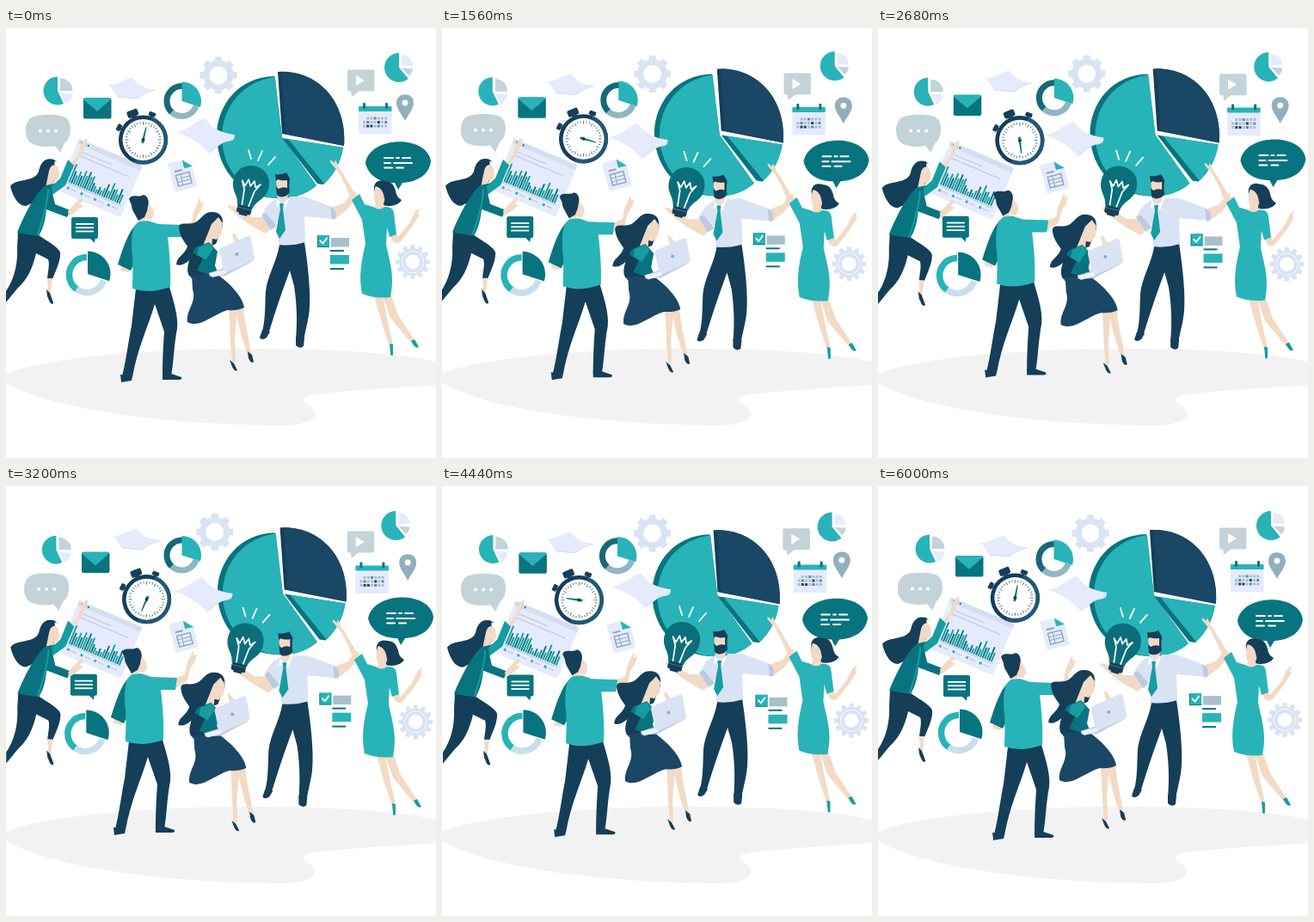
An HTML page with a canvas that plays this animation: 500 px wide and 500 px high, repeating every 6040 ms.

```html
<!DOCTYPE html>
<html lang="en">
<head>
<meta charset="utf-8">
<title>Team at work</title>
<style>
html, body { margin: 0; width: 100%; height: 100%; overflow: hidden; background: #fff; }
canvas { display: block; width: 500px; height: 500px; }
</style>
</head>
<body>
<canvas id="stage" width="500" height="500"></canvas>
<script>
const canvas = document.getElementById('stage');
const ratio = window.devicePixelRatio || 1;
canvas.width = canvas.height = 500 * ratio;
const c = canvas.getContext('2d');
const LOOP = 6040, TAU = Math.PI * 2;
const NAVY = '#1a4765', INK = '#153e59', TEAL = '#28b3b8', DEEP = '#08747f', MID = '#159da1',
  PALE = '#e5ebfc', MIST = '#c3d3d8', SKIN = '#f2dac5', SHIRT = '#d9e3f3', GEAR = '#d8e3f3', WHITE = '#fff';

// ---- drawing helpers ----
function fill(d, color) { c.fillStyle = color; c.fill(new Path2D(d)); }
function stroke(d, color, width) {
  c.strokeStyle = color; c.lineWidth = width;
  c.lineCap = c.lineJoin = 'round';
  c.stroke(new Path2D(d));
}
function rect(x, y, w, h, color, r = 0) {
  c.fillStyle = color; c.beginPath(); c.roundRect(x, y, w, h, r); c.fill();
}
function disc(x, y, r, color) {
  c.fillStyle = color; c.beginPath(); c.arc(x, y, r, 0, TAU); c.fill();
}
// angles in turns, clockwise from the top
function wedge(x, y, r, a, b, color) {
  c.fillStyle = color; c.beginPath(); c.moveTo(x, y);
  c.arc(x, y, r, (a - .25) * TAU, (b - .25) * TAU); c.closePath(); c.fill();
}
function ring(x, y, r, w, a, b, color) {
  c.strokeStyle = color; c.lineWidth = w; c.lineCap = 'butt'; c.beginPath();
  c.arc(x, y, r, (a - .25) * TAU, (b - .25) * TAU); c.stroke();
}
function turned(x, y, angle, draw) {
  c.save(); c.translate(x, y); c.rotate(angle); draw(); c.restore();
}
function gear(x, y, n, r, tooth, band) {
  turned(x, y, 0, () => {
    for (let i = 0; i < n; i++) {
      rect(-tooth / 2, -r, tooth, 7, GEAR, 1);
      c.rotate(TAU / n);
    }
    ring(0, 0, r - 4 - band / 2, band, 0, 1, GEAR);
  });
}
// drift: amplitude and time of the largest value on each axis
function part(ax, tx, ay, ty, draw) {
  const swing = (a, peak) => a * (Math.cos((now - peak) / LOOP * TAU) - Math.cos(peak / LOOP * TAU));
  c.save(); c.translate(swing(ax, tx), swing(ay, ty)); draw(); c.restore();
}
let now = 0;

// ---- scenery ----
function ground() {
  fill('M0 402C40 385 150 374 270 373C370 372 460 378 500 388V415C460 418 400 421 360 426C340 429 344 434 354 440C367 452 354 461 325 462C200 462 50 445 0 412Z', '#f2f2f3');
}
function pieBase() {
  fill('M312 56C272 57 245 88 245 126C246 168 276 198 318 198C336 198 351 192 361 183L321 127Z', DEEP);
  fill('M313 57C274 62 251 93 251 128C252 168 282 198 320 198C337 198 351 192 361 183L321 127Z', TEAL);
}
function pieSlices() {
  fill('M321 128L392 139C389 157 381 171 369 182L362 181Z', DEEP);
  fill('M328 129L392 139C389 157 381 171 370 181Z', TEAL);
  fill('M316 51C362 48 397 85 393 137L321 123Z', INK);
  fill('M320 51C364 50 396 87 393 137L325 123Z', NAVY);
}
function pieLeft() {
  wedge(60, 73, 16.5, .43, 1, TEAL);
  wedge(62.5, 75, 15, .27, .42, PALE);
  wedge(63, 73, 14.5, 0, .25, MIST);
}
function pieRight() {
  wedge(457, 46, 17, .39, 1, TEAL);
  wedge(460, 44, 13, 0, .25, PALE);
  wedge(460, 46.5, 13, .26, .38, MIST);
}
function envelope() {
  rect(90, 81.5, 32.5, 24, DEEP, 2);
  fill('M90 83Q90 81 92 81H120Q122 81 122 83L107 96Q106 97 105 96Z', TEAL);
}
function greyTalk() {
  fill('M32 103C42 100 58 100 67 103C78 107 77 128 68 134L63 145L57 137C48 139 38 138 31 135C20 130 20 107 32 103Z', MIST);
  for (let i = 0; i < 3; i++) disc(40 + i * 9, 119.5, 2, WHITE);
}
function sheet1() {
  fill('M118 66C130 67 137 59 147 57.5C152 64 158 71 175 71C166 74 160 76 155 81C150 85 140 80 131 81C126 79 126 70 118 66Z', PALE);
  stroke('M131 80C140 79 150 84 155 80C160 76 166 74 173 72', '#d4def2', 1);
}
function sheet2() {
  fill('M197 121C213 119 220 108 231 105C238 115 248 122 266 124Q266 130 262 131C250 132 246 139 236 146C228 135 213 126 197 121Z', PALE);
  stroke('M265 125Q264 129 260 131C250 132 246 138 237 144', '#d4def2', 1);
}
function donutTop() {
  ring(204.5, 85, 17.5, 7, .3, .64, '#8fb6c2');
  ring(204.5, 85, 17.5, 7, .62, 1.02, '#16697a');
  wedge(204.5, 85, 22.5, 0, .3, TEAL);
}
function donutLeft() {
  ring(94, 287, 20.5, 7.5, .59, 1, TEAL);
  ring(94, 287, 20.5, 7.5, .3, .6, '#c8deeb');
  wedge(95, 286, 26.5, 0, .3, DEEP);
}
function innerGear() {
  gear(473, 272, 12, 20, 5, 3);
  ring(473, 272, 10.2, 4, 0, 1, GEAR);
}
function formSheet() {
  turned(205, 171, -.25, () => {
    fill('M-13 -17H5L14 -8V17H-13Z', PALE);
    fill('M4 -17L14 -7H4Z', TEAL);
    rect(-8, -7, 9, 2, '#8ba6bb');
    c.strokeStyle = '#8ba6bb'; c.lineWidth = 1.4;
    c.strokeRect(-7.5, -1.5, 16, 13);
    stroke('M-7 3H8M-7 7H8M-2 -1V11', '#8ba6bb', 1);
  });
}
function tealNote() {
  rect(76, 220, 31, 25, DEEP, 2);
  fill('M96 243H104L103 250Z', DEEP);
  for (let i = 0; i < 3; i++) rect(81, 227 + i * 4.3, 21, 1.8, WHITE);
}
function videoNote() {
  rect(397, 48.5, 31.5, 25, MIST, 2);
  fill('M401 72H412L402 80Z', MIST);
  fill('M407 55L417 61L407 67Z', WHITE);
}
function calendar() {
  rect(410, 92, 38.5, 31.5, PALE, 1);
  rect(410, 91, 38.5, 6, TEAL, 1);
  for (const x of [415, 441]) rect(x, 87, 3, 7, DEEP, 1);
  for (let row = 0; row < 3; row++)
    for (let col = 0; col < 7; col++) {
      const i = row * 7 + col;
      if (i) rect(415 + col * 4.2, 103.5 + row * 4.5, 3, 3,
        [11, 15, 16].includes(i) ? NAVY : i % 5 == 3 ? '#5c8d9d' : '#a9bfce');
    }
}
function pin() {
  fill('M464 108C459 98 454 94 454 87C454 74 474 74 474 87C474 94 468 100 464 108Z', '#91b0bc');
  disc(464, 87, 3.4, WHITE);
}
function darkTalk() {
  fill('M418 157C423 125 490 124 494 155C492 171 478 179 461 180L456 188L452 180C434 180 421 171 418 157Z', DEEP);
  stroke('M440 151H450M454 151H457M461 151H470M440 157H447M451 157H472M440 162.5H449M454 162.5H462', WHITE, 2);
}
function checklist() {
  rect(362, 241, 14, 14, DEEP);
  rect(363, 241, 13, 13, TEAL);
  stroke('M365.5 247.5L368.5 250.5L373 244.5', WHITE, 1.8);
  rect(378, 244, 21, 10.5, '#a9c0ca');
  rect(377, 258, 16, 2, DEEP);
  rect(377, 264, 22, 10.5, TEAL);
  rect(377, 279, 16, 2, DEEP);
}
function stopwatch() {
  turned(159.5, 130, -.38, () => {
    rect(-3, -33, 6, 6, DEEP);
    rect(-6.5, -37, 13, 8, INK, 2);
    for (const a of [-.72, .72]) turned(0, 0, a, () => {
      rect(-1.5, -31, 3, 4, DEEP);
      rect(-4, -34, 8, 5, INK, 1);
    });
  });
  disc(159.5, 130, 28.6, INK);
  wedge(159.5, 130, 28.6, .06, .56, '#225875');
  disc(159.5, 130, 24, WHITE);
  turned(159.5, 130, 0, () => {
    for (let i = 0; i < 36; i++) {
      rect(-.5, -21, 1, i % 3 ? 2.5 : 4, '#5c8190');
      c.rotate(TAU / 36);
    }
  });
  turned(159.5, 130, now / LOOP * TAU + .23, () => {
    fill('M-1.4 4L-.6 -15H.6L1.4 4Z', DEEP);
    disc(0, 0, 2, INK);
  });
}
function report() {
  turned(85, 129, .4, () => {
    rect(0, 0, 80, 65, PALE, 2);
    rect(0, 0, 80, 6, '#d3def1', 2);
    for (let i = 0; i < 3; i++) disc(5 + i * 4, 3, 1.1, DEEP);
    rect(8, 12, 38, 1.5, '#c4d1e2');
    rect(8, 17, 62, 1.5, '#c4d1e2');
    const bars = [23, 15, 11, 17, 13, 20, 15, 21, 16, 18, 11, 8, 5, 9, 6, 10, 16, 9, 20, 13, 14, 9, 17, 11];
    bars.forEach((h, i) => rect(8 + i * 2.75, 51 - h, 1.9, h, i % 3 == 1 ? DEEP : MID));
    rect(7, 52, 68, 1, '#b9cad9');
    for (let i = 0; i < 4; i++) {
      rect(9 + i * 17, 56, 3, 3, i % 2 ? TEAL : '#789cad');
      rect(14 + i * 17, 57, 7, 1.2, '#b9cad9');
    }
  });
}

// ---- people ----
function reportWoman() {
  fill('M14 237L38 241C50 249 61 255 63 261C64 270 58 282 54 292L48 291C49 282 51 274 49 269L35 262C31 280 24 293 14 302L0 319V306C9 293 14 275 13 255Z', INK);
  fill('M48 291H54L52 307H49Z', SKIN);
  fill('M47 304L51 308L55 319Q55 323 51 319L48 312Z', INK);
  fill('M56 153C45 150 40 157 38 167C33 180 12 174 5 184C8 196 14 207 23 207C36 202 53 190 58 172Z', INK);
  fill('M50 166C52 158 59 157 61 164L62 171L60 177L55 178L54 188L46 186Z', SKIN);
  fill('M58 155C51 156 51 165 47 174L43 164C45 152 56 150 60 157Z', INK);
  fill('M75 158L84 147L87 135L92 129Q97 129 94 133L89 145L79 161Z', SKIN);
  fill('M46 183C36 190 22 215 13 238L38 242C45 230 46 219 47 211L71 220L75 212L57 205L54 192L60 180Z', DEEP);
  fill('M53 184L63 175L72 153L79 160L69 183L54 194Z', MID);
  stroke('M49 188C49 202 43 222 37 240', MID, 2);
  fill('M72 213L79 205L87 197L90 200L85 205L90 206L82 213L73 219Z', SKIN);
}
function backMan() {
  fill('M133 403L147 405L146 410Q139 411 134 412Z', INK);
  fill('M182 402H192L204 406Q205 409 201 409H182Z', INK);
  fill('M151 303L190 301C196 321 202 341 198 355C195 374 195 388 192 405H182C182 385 183 367 184 353L173 321C165 348 153 372 147 406L135 405C140 385 142 366 146 346Z', INK);
  fill('M202 231L216 225L218 214L221 207L225 198Q227 198 226 203L230 202L228 209L222 219L219 232L204 242Z', SKIN);
  fill('M156 211L165 203L171 211L172 217L169 223L162 222V230L154 228Z', SKIN);
  fill('M143 199C146 192 153 198 160 194C165 195 167 202 165 207L164 213L161 220L154 224C150 216 146 212 146 206Z', INK);
  fill('M134 276L145 281L142 284L133 282Z', SKIN);
  fill('M155 226C145 231 137 251 130 275L145 282L155 262Z', DEEP);
  fill('M155 225C146 230 145 245 147 266C148 281 147 294 147 303Q167 310 191 301C192 282 190 260 188 243L205 243L207 229L177 228L165 224Z', TEAL);
}
function seatedWoman() {
  fill('M259 328H269L266 362L267 388L263 389C260 365 261 347 259 328Z', SKIN);
  fill('M267 327L276 325C278 347 283 362 285 379L281 380C274 360 270 345 267 327Z', SKIN);
  fill('M260 386L265 390L269 398Q266 400 263 394Z', INK);
  fill('M281 376L286 380L288 388Q285 391 282 384Z', INK);
  fill('M241 214C230 213 228 222 220 226C211 230 202 224 201 232C202 243 208 249 211 254C207 265 199 265 198 275C208 279 218 265 224 259L244 251L252 231C253 220 250 215 241 214Z', INK);
  fill('M239 228L247 220L252 227L251 239L245 246L240 245L239 257L229 253Z', SKIN);
  fill('M245 218C236 219 239 231 231 244L226 234C228 219 240 211 249 219Z', INK);
  fill('M221 255L236 249L246 260L243 276L248 289L215 291C215 278 213 264 221 255Z', DEEP);
  fill('M224 255L236 250L241 257L232 270L222 264Z', MID);
  fill('M217 261L229 268L222 282L240 288L236 294L214 289C208 283 213 269 217 261Z', INK);
  fill('M216 287L245 286C258 295 275 311 277 325Q269 329 258 328C240 333 225 350 211 342C209 328 222 319 217 304Z', NAVY);
}
function laptop() {
  fill('M265 248L263 240Q264 237 267 241L272 248L270 253Z', SKIN);
  fill('M236 285L254 279L286 269L287 271L255 288L237 289Z', '#bdcbe0');
  fill('M249 256L281 242Q284 241 285 244L289 267Q289 270 286 271L257 284Q254 285 253 282L248 259Q248 257 249 256Z', SHIRT);
  fill('M236 285L254 281L257 285L240 290Z', '#edf2fa');
  disc(268.5, 263, 2, '#91a9c5');
}
function beardMan() {
  fill('M298 351L307 353L303 360Q297 364 295 360Z', INK);
  fill('M337 359L347 360L346 370Q342 374 337 369Z', INK);
  fill('M318 252L347 249C352 282 356 320 351 340L346 363L337 362C339 340 338 320 335 300L330 282C323 301 317 318 311 337L305 356L298 353C302 337 301 322 302 306C304 288 315 271 318 252Z', INK);
  fill('M303 220L285 220L270 209L259 206Q255 207 264 213L270 219L284 229L302 239L310 232Z', SKIN);
  fill('M378 209L394 203L400 195L407 190L406 195L411 195L405 201L396 212L382 222Z', SKIN);
  fill('M314 174H328V194L326 203H316Z', SKIN);
  fill('M305 205L315 198L327 202L330 196L347 196L377 207Q383 213 380 222L347 219L348 249Q332 254 317 252L316 225L303 240L311 231L297 218Z', SHIRT);
  fill('M297 218L302 215L315 230L308 235Z', '#bacbe1');
  fill('M377 207L383 212L384 221L379 223Z', '#bacbe1');
  fill('M315 199L321 205L329 198L325 210L320 206L314 208Z', WHITE);
  fill('M318 204H323L322 210L325 235L318 245L314 237L319 210Z', MID);
  fill('M313 170Q320 171 326 168L330 175L329 186H327V177Q320 178 316 176L314 178Z', INK);
  fill('M314 184L317 187Q322 184 327 186L329 183L330 191C327 197 318 198 315 194Z', INK);
}
function dressWoman() {
  fill('M428 311H438L444 342L450 368L446 370L437 343Z', SKIN);
  fill('M438 311H448L456 334L475 363L471 366L447 337Z', SKIN);
  fill('M446 367L450 368L450 380Q447 383 447 377Z', MID);
  fill('M471 364L475 362L480 371Q477 373 474 369Z', MID);
  fill('M441 178C431 175 427 182 428 188C427 200 435 207 445 207C452 207 458 204 460 200Q454 197 453 189Q450 178 441 178Z', INK);
  fill('M430 183C427 191 427 198 430 204L427 213L441 213L439 204C443 196 439 188 434 183Z', SKIN);
  fill('M429 184C435 185 439 189 440 199L447 195L443 180L432 179Z', INK);
  fill('M403 203L394 182L387 168L377 156L377 153L382 157L383 153L387 162L393 171L403 188L414 202L416 211Z', SKIN);
  fill('M446 239L453 237L456 243L469 227L476 213L481 209L479 215L481 217L473 230L458 249Q449 253 446 239Z', SKIN);
  fill('M402 200L411 193L417 205L427 208Q434 213 440 208Q450 207 451 215L454 240L446 243L443 232L442 252C447 275 452 289 447 313Q429 315 414 309C410 290 413 271 418 251L414 223Z', TEAL);
}
function bulb() {
  turned(285, 181, .26, () => {
    fill('M-21 0C-21 -28 21 -28 21 0C21 14 11 16 9 28H-9C-11 16 -21 14 -21 0Z', '#0a6f7b');
    rect(-8.5, 27, 17, 9, INK, 2);
    rect(-5, 35, 10, 3, INK, 1);
    stroke('M-8 30H8', '#467488', 1);
    stroke('M-4 26L-6 8L-11 -1L-6 4L-4 -4L0 3L3 -4L6 3L11 -2L6 8L4 26', WHITE, 1.7);
  });
  stroke('M282 142L285 152M298 143L293 154M313 150L305 159', WHITE, 1.8);
}

function frame() {
  now = performance.now() % LOOP;
  c.setTransform(ratio, 0, 0, ratio, 0, 0);
  c.fillStyle = WHITE; c.fillRect(0, 0, 500, 500);
  ground();
  part(.9, 5700, .6, 2900, pieLeft);
  part(1.2, 5600, 2.6, 600, envelope);
  part(.9, 5900, .9, 4400, greyTalk);
  part(2.8, 2900, 4, 6000, sheet1);
  part(.7, 1600, 2.5, 500, donutTop);
  part(2.2, 0, 1.1, 5300, () => gear(247, 55, 8, 21.5, 8, 7));
  part(2.5, 4400, 2.6, 4000, formSheet);
  part(.6, 5800, .7, 5700, tealNote);
  part(1, 5600, .5, 3300, donutLeft);
  part(.6, 1400, 2.7, 2400, videoNote);
  part(2, 5700, .8, 2700, calendar);
  part(2, 2500, 2.4, 2000, pin);
  part(2.3, 700, 1.6, 4600, pieRight);
  part(1.8, 2600, 1.5, 6000, darkTalk);
  part(2, 3700, 1.5, 2500, innerGear);
  part(1.7, 3900, 2.3, 4700, checklist);
  part(1.4, 1900, 1.7, 5150, pieBase);
  part(2.6, 2100, 2.4, 5150, pieSlices);
  part(2.3, 5200, 5, 1700, sheet2);
  part(1, 4600, 3, 3900, report);
  part(3.5, 2200, 2, 4200, stopwatch);
  part(1, 4500, 2.5, 3900, reportWoman);
  part(4.6, 5650, 3, 150, backMan);
  part(1.4, 3700, 1.5, 2800, seatedWoman);
  part(3.4, 700, 1.7, 2400, laptop);
  part(1.7, 3200, 1.9, 1900, beardMan);
  part(4, 700, 2, 1500, bulb);
  part(1.5, 2900, 3, 1950, dressWoman);
  requestAnimationFrame(frame);
}
requestAnimationFrame(frame);
</script>
</body>
</html>
```
